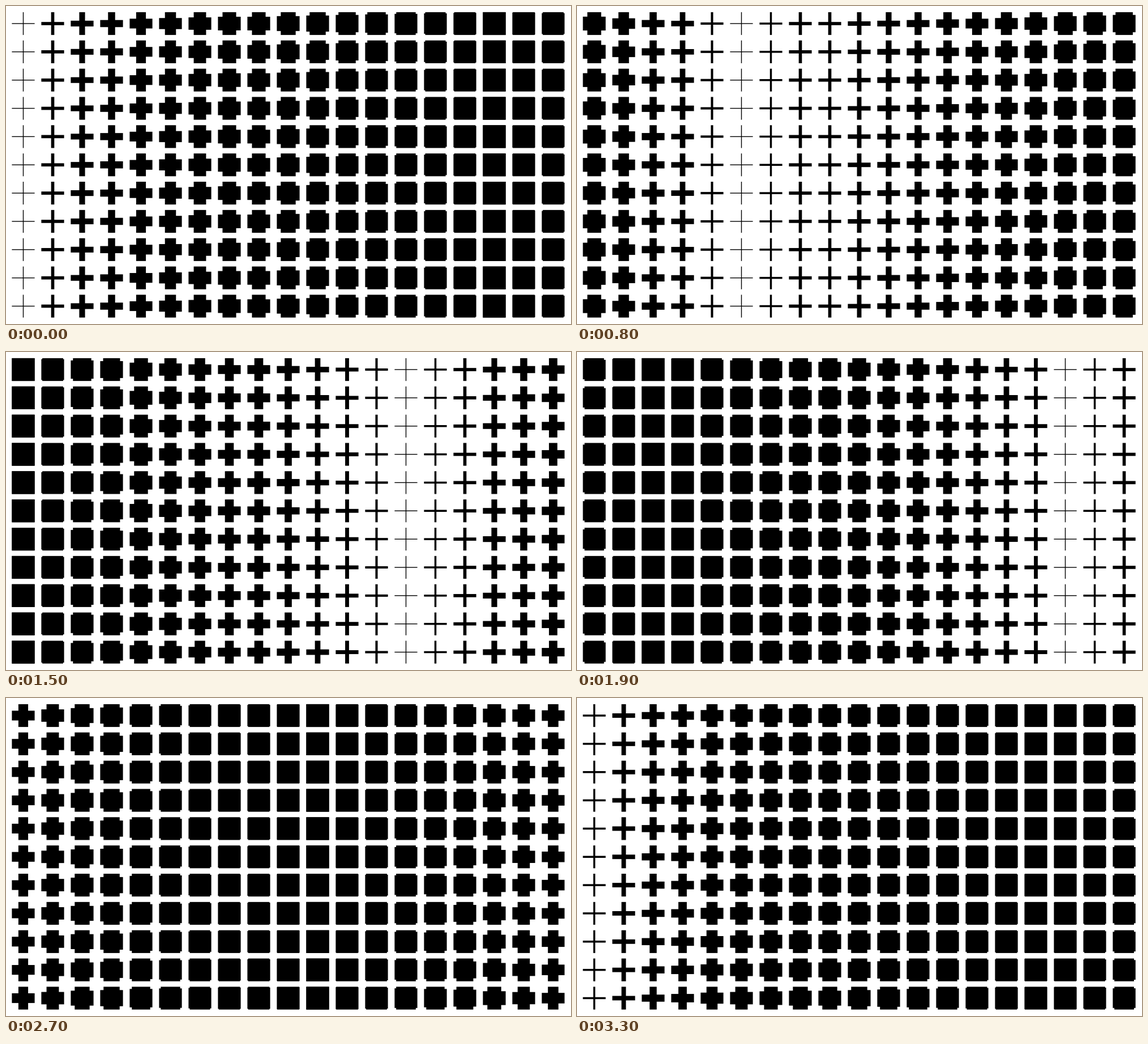
Animation of 998 by 561 pixels, one loop 3.4 s. Source, as an HTML page with a canvas:

```html
<!DOCTYPE html>
<html lang="en">
<head>
<meta charset="utf-8">
<title>Cross wave</title>
<style>
  html, body { margin: 0; width: 100%; height: 100%; overflow: hidden; background: #fff; }
  canvas { display: block; width: 998px; height: 561px; }
</style>
</head>
<body>
<canvas id="stage" width="998" height="561"></canvas>
<script>
const ctx = document.getElementById('stage').getContext('2d');
const STEP = 100, STEPS = 34, RISE = 15;
const COLS = 19, ROWS = 11, SIZE = 40.2, THIN = 1.4;
const LEFT = 30.5, TOP = 31, DX = 52, DY = 49.85;

// Path of the thin column across the grid: [column, step].
const sweep = [[0, 0.8], [5, 8.98], [8, 10.52], [18, 21.15]];

function startOf(col) {
  const k = Math.max(1, sweep.findIndex(p => p[0] >= col));
  const [c0, s0] = sweep[k - 1], [c1, s1] = sweep[k];
  return Math.floor(s0 + (s1 - s0) * (col - c0) / (c1 - c0));
}

// Nearly linear, slightly softened towards the full square.
const ease = u => u + 0.45 * u * u * (1 - u);

function thickness(age) {
  const u = age < RISE ? age / RISE : (STEPS - age) / (STEPS - RISE);
  return THIN + (SIZE - THIN) * ease(u);
}

function cross(x, y, w) {
  const h = SIZE / 2;
  ctx.fillRect(x - w / 2, y - h, w, SIZE);
  ctx.fillRect(x - h, y - w / 2, SIZE, w);
}

function draw(ms) {
  const now = Math.floor(ms / STEP) % STEPS;
  ctx.fillStyle = '#fff';
  ctx.fillRect(0, 0, 998, 561);
  ctx.fillStyle = '#000';
  for (let col = 0; col < COLS; col++) {
    const w = thickness((now - startOf(col) + STEPS) % STEPS);
    for (let row = 0; row < ROWS; row++) cross(LEFT + col * DX, TOP + row * DY, w);
  }
}

const begin = performance.now();
function tick() {
  draw(performance.now() - begin);
  requestAnimationFrame(tick);
}
tick();
</script>
</body>
</html>
```
